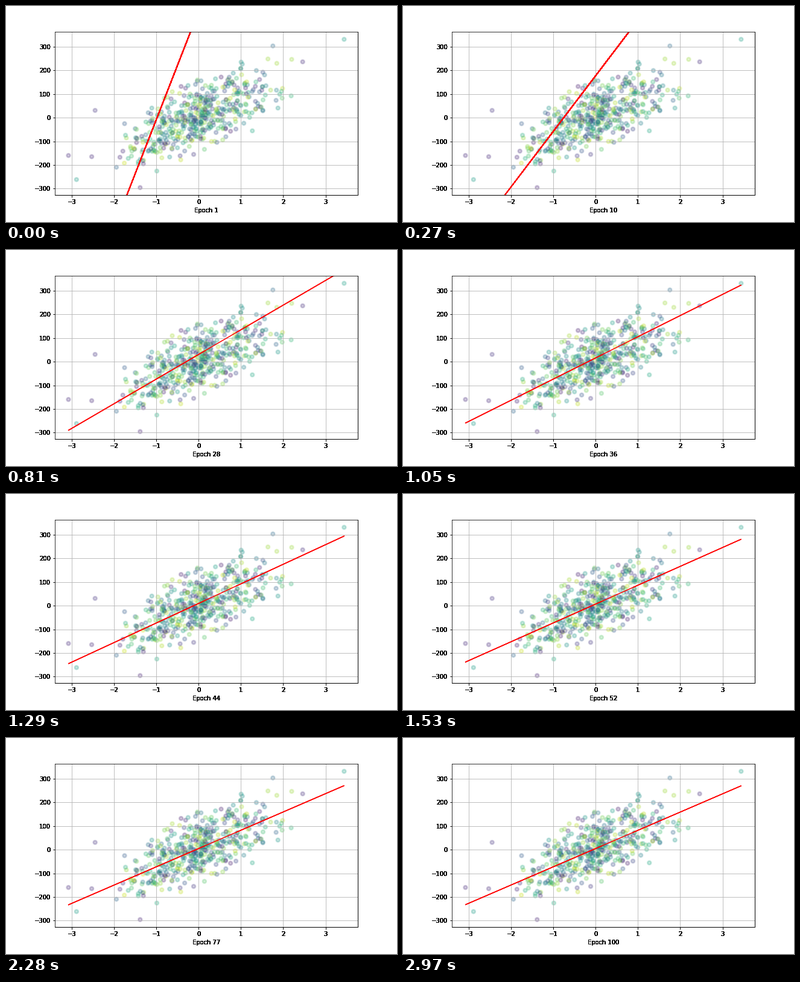
A matplotlib script for the animation above (3 s loop, 648x360 px).

```python
import numpy as np
import matplotlib.pyplot as plt
from matplotlib.animation import FuncAnimation

EPOCHS, STEP_MS = 100, 30
SLOPE, BIAS = 77.2, 5.0

# Samples that set the extent of the cloud: x, y, shade
EXTREMES = [(-3.08, -160, 0.12), (-2.53, -165, 0.12), (-2.45, 31, 0.15),
            (-2.89, -262, 0.55), (-1.385, -296, 0.1), (1.755, 304, 0.35),
            (3.44, 332, 0.57)]


def make_samples(n=490, seed=7):
    """Noisy linear cloud plus its extremes, in shuffled order."""
    rng = np.random.default_rng(seed)
    x = rng.normal(0.1, 0.93, 3 * n)
    noise = rng.normal(0, 70, 3 * n)
    y = SLOPE * x + BIAS + noise
    keep = (x > -2.1) & (x < 2.5) & (abs(noise) < 160) & (abs(y) < 250)
    cloud = np.column_stack([x, y, rng.uniform(0.08, 0.93, 3 * n)])[keep][:n]
    return rng.permutation(np.vstack([cloud, EXTREMES])).T


def heavy(text, passes=10):
    """Draw a text several times over so its soft edges turn solid."""
    draw = text.draw

    def draw_all(renderer):
        for _ in range(passes):
            draw(renderer)

    text.draw = draw_all


plt.rcParams.update({"font.family": "DejaVu Sans", "font.size": 10,
                     "figure.subplot.bottom": 0.125})
fig, ax = plt.subplots(figsize=(9, 5), dpi=72)
x, y, shade = make_samples()
ax.scatter(x, y, c=shade, cmap="viridis", vmin=0, vmax=1, alpha=0.25,
           linewidths=2.5)
line, = ax.plot([], [], color="red", lw=1.5)
ax.set_xlim(-3.4012, 3.7658)
ax.set_ylim(-327.4, 363.4)
ax.set_xticks(range(-3, 4))
ax.set_yticks(range(-300, 301, 100))
ax.tick_params(width=1)
ax.spines[["right", "bottom"]].set_linewidth(1)
ax.grid(True)
label = ax.set_xlabel("Epoch 1")
for text in [label, *ax.get_xticklabels(), *ax.get_yticklabels()]:
    heavy(text)


def update(i):
    """Both fit errors shrink geometrically, as in gradient descent."""
    w = SLOPE + 381.7 * 0.9068 ** i
    b = BIAS + 447 * 0.9 ** i
    line.set_data(x, w * x + b)
    label.set_text(f"Epoch {i + 1}")
    return line, label


anim = FuncAnimation(fig, update, frames=EPOCHS, interval=STEP_MS,
                     repeat=True, repeat_delay=0, blit=False)
plt.show()
```
